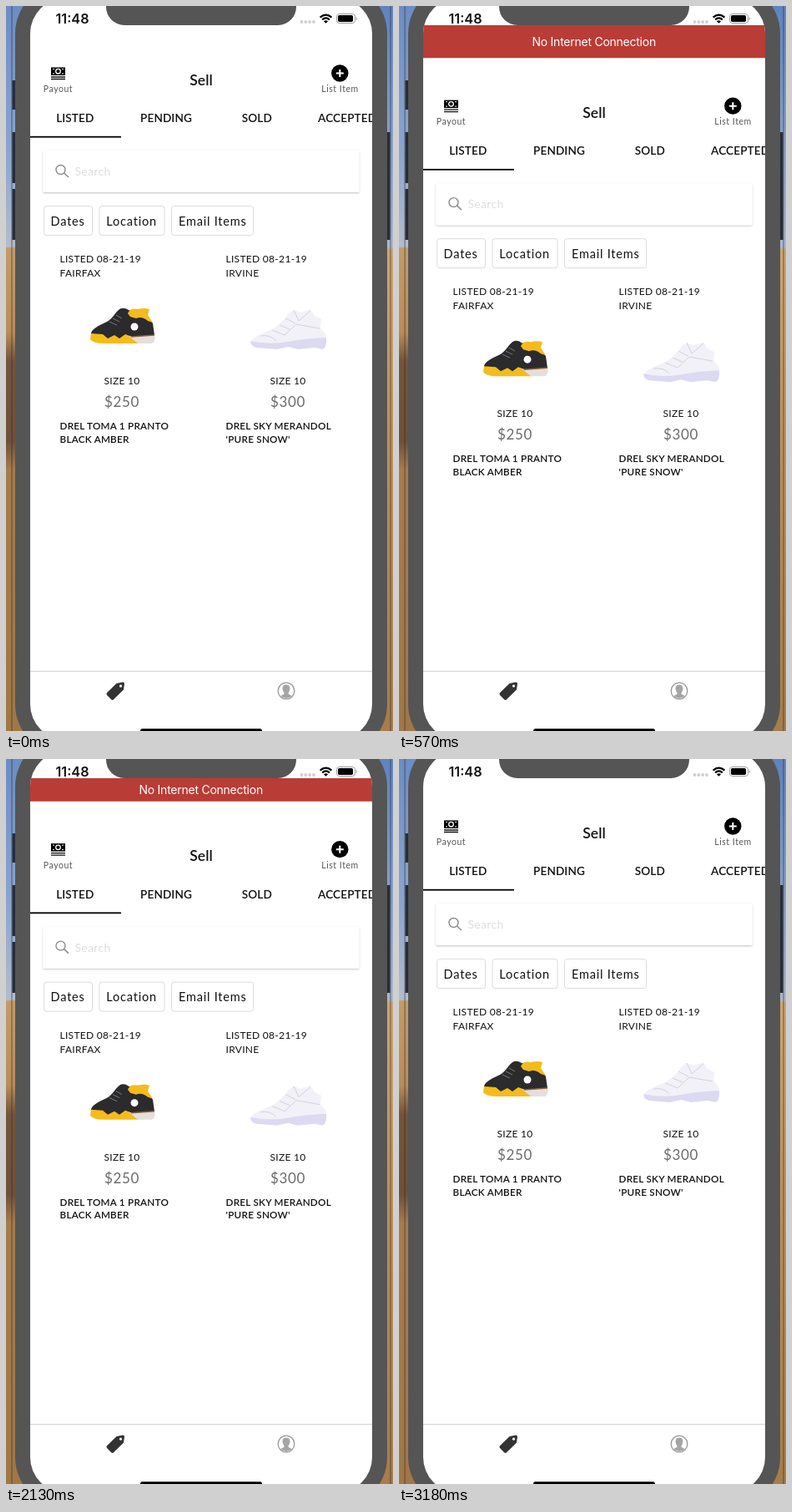
Recreate the animation shown at these times as an HTML page. Size 464 px wide and 868 px high, loop 3210 ms.

```html
<!DOCTYPE html>
<html lang="en">
<head>
<meta charset="utf-8">
<title>Sell screen</title>
<style>
html, body { margin: 0; width: 100%; height: 100%; overflow: hidden; background: #fff; }
svg { display: block; }
text { font-family: Lato, "Open Sans", sans-serif; fill: #111; }
.mid { text-anchor: middle; }
.ui { font-family: Inter, "Liberation Sans", sans-serif; }
.title { font-size: 17.5px; font-weight: 600; }
.small { font-size: 10.5px; letter-spacing: .55px; fill: #555; }
.tab { font-size: 13.6px; font-weight: 600; letter-spacing: .1px; }
.button { font-size: 14.5px; letter-spacing: .8px; }
.meta { font-size: 12px; letter-spacing: .3px; }
.price { font-size: 17px; letter-spacing: .7px; fill: #6b6b6b; }
.name { font-size: 11.7px; font-weight: 600; letter-spacing: .25px; }
.box { fill: #fff; stroke: #dcdcdc; }
</style>
</head>
<body>
<svg width="464" height="868" viewBox="0 0 464 868">
  <defs>
    <linearGradient id="left" x2="0" y2="1">
      <stop offset="0" stop-color="#6b8dc4"/>
      <stop offset=".2" stop-color="#8ba5cf"/>
      <stop offset=".332" stop-color="#b3bccb"/>
      <stop offset=".334" stop-color="#c39b68"/>
      <stop offset=".45" stop-color="#b98d58"/>
      <stop offset=".49" stop-color="#75543a"/>
      <stop offset=".6" stop-color="#6f5038"/>
      <stop offset=".64" stop-color="#a57c4c"/>
      <stop offset="1" stop-color="#a17746"/>
    </linearGradient>
    <linearGradient id="right" x2="0" y2="1">
      <stop offset="0" stop-color="#5f83bf"/>
      <stop offset=".332" stop-color="#a9b7cf"/>
      <stop offset=".336" stop-color="#cba473"/>
      <stop offset=".6" stop-color="#bd915c"/>
      <stop offset="1" stop-color="#a67d4b"/>
    </linearGradient>
    <filter id="shadow" x="-5%" y="-20%" width="110%" height="150%">
      <feDropShadow dx="0" dy="1" stdDeviation="1.1" flood-opacity=".25"/>
    </filter>
    <clipPath id="screen"><rect x="29" y="-9.5" width="410" height="888" rx="42.6"/></clipPath>
  </defs>

  <!-- desktop and phone body -->
  <rect width="232" height="868" fill="url(#left)"/>
  <rect x="232" width="232" height="868" fill="url(#right)"/>
  <path d="M7 0V868M461 0V868" stroke="#2b2b2b" stroke-opacity=".6"/>
  <path d="M9.5 89V124M9.5 151V212M9.5 219V280M458.5 151V280" stroke="#272d38" stroke-width="4"/>
  <rect x="11" y="-27.5" width="446" height="924" rx="60.6" fill="#555"/>

  <g clip-path="url(#screen)">
    <rect x="29" width="410" height="868" fill="#fff"/>

    <g id="page">
      <rect x="54" y="73.5" width="17" height="9.5"/>
      <path d="M54 85H71M54 87.5H71" stroke="#111" stroke-width="1.3"/>
      <circle cx="62.5" cy="78.2" r="2.8" fill="none" stroke="#fff" stroke-width="1.3"/>
      <path d="M56 75.5h2M67 75.5h2M56 81h2M67 81h2" stroke="#fff"/>
      <text class="small mid" x="62.5" y="103">Payout</text>
      <text class="title mid" x="234" y="94.5">Sell</text>
      <circle cx="400.3" cy="80.5" r="10.2"/>
      <path d="M395.8 80.5h9M400.3 76v9" stroke="#fff" stroke-width="2"/>
      <text class="small mid" x="400.5" y="103">List Item</text>

      <text class="tab mid" x="82.8" y="139">LISTED</text>
      <text class="tab mid" x="192" y="139">PENDING</text>
      <text class="tab mid" x="300.8" y="139">SOLD</text>
      <text class="tab" x="374" y="139">ACCEPTED</text>
      <rect x="29" y="155.8" width="109" height="1.8"/>

      <rect x="44.5" y="173" width="379" height="50" rx="1.5" fill="#fff" filter="url(#shadow)"/>
      <g fill="none" stroke="#8a8a8a" stroke-width="1.4">
        <circle cx="65.5" cy="196" r="5.5"/><path d="M69.5 200L75 205"/>
      </g>
      <text x="82.5" y="203" font-size="14" letter-spacing=".3" style="fill:#dedede">Search</text>

      <rect class="box" x="45.5" y="239.5" width="58" height="35" rx="3"/>
      <rect class="box" x="112" y="239.5" width="78" height="35" rx="3"/>
      <rect class="box" x="198.5" y="239.5" width="98" height="35" rx="3"/>
      <text class="button" x="53.6" y="262.7">Dates</text>
      <text class="button" x="120.3" y="262.7">Location</text>
      <text class="button" x="207" y="262.7">Email Items</text>

      <g id="items"></g>

      <!-- dark shoe -->
      <path fill="#f4bb1c" d="M102 391L157 391L160 404L118 404Q104 404 101 399Z"/>
      <path fill="#e4dfda" d="M146 394L178 394Q180 401 175 404L158 404Z"/>
      <path fill="#2b2a2d" d="M102 392C103 386 113 382 121 378C127 375 131 367 136 363Q141 360 147 364L168 370L176 380L178 394L151 396L143 393L136 398L130 394L122 398L116 393Z"/>
      <path fill="#f4bb1c" d="M146 368Q149 361 158 363Q166 361 172 363L170 370L176 379L170 377Q163 371 156 374L149 372Z"/>
      <path fill="none" stroke="#8d6040" stroke-width="1.5" d="M150 396L178 394"/>
      <path fill="none" stroke="#777" d="M124 378L133 382M128 374L136 378M132 370L139 374"/>
      <circle cx="154" cy="384" r="4.5" fill="#fff"/>

      <!-- pale shoe -->
      <path fill="#f2f1f8" d="M294 402C295 396 308 392 319 387C328 382 335 374 339 368L345 364L353 367L360 365L365 363L370 371L378 375L377 385L384 394L383 405L300 406Z"/>
      <path fill="#dcd9f3" d="M293 401Q315 406 338 402Q357 398 384 397Q385 408 380 411L370 409L350 411L338 408L325 411L300 409Q293 407 293 401Z"/>
      <path fill="none" stroke="#d3d2de" d="M319 388L334 394L348 381L376 386M328 382L340 387M335 374L347 380M345 364L351 377L365 365M305 395Q317 393 324 401"/>
    </g>

    <!-- banner, clipped to its growing height -->
    <svg id="banner" x="29" y="23" width="410" height="0">
      <rect width="410" height="40" fill="#b93c36"/>
      <text id="notice" class="ui mid" x="204.7" font-size="14" letter-spacing="-.25" style="fill:#fff">No Internet Connection</text>
    </svg>

    <!-- status bar -->
    <text class="ui" x="59.5" y="20.9" font-size="16.2" font-weight="600">11:48</text>
    <g fill="#cfcfcf">
      <circle cx="354.5" cy="19" r="1.9"/><circle cx="359.3" cy="19" r="1.9"/>
      <circle cx="364.1" cy="19" r="1.9"/><circle cx="368.9" cy="19" r="1.9"/>
    </g>
    <path d="M376.6 13.6Q383.5 7.5 390.4 13.6M379.2 16.3Q383.5 12.6 387.8 16.3" fill="none" stroke="#000" stroke-width="2.2"/>
    <path d="M380.9 18.2Q383.5 16.2 386.1 18.2L383.5 20.8Z"/>
    <rect x="396.5" y="9.5" width="22" height="11" rx="3.2" fill="none" stroke="#999"/>
    <rect x="398" y="11" width="18" height="8" rx="1.8"/>
    <path d="M419.8 13Q422 15 419.8 17.3Z" fill="#888"/>
    <path d="M120 0V1A22 22 0 0 0 142 23H326A22 22 0 0 0 348 1V0Z" fill="#555"/>

    <!-- tab bar -->
    <path d="M29 796.5H439" stroke="#d2d2d2"/>
    <path fill="#333" fill-rule="evenodd" d="M132.5 811L140 809.5Q142 809.5 142 811.5L141 818.5L129 830.3Q127.6 831.5 126.2 830.3L121 825Q119.8 823.5 121 822.2ZM137.5 812.6a1.6 1.6 0 1 0 .01 0Z"/>
    <circle cx="336" cy="820" r="9.8" fill="#fff" stroke="#989898" stroke-width="1.3"/>
    <path fill="#a5a5a5" d="M336 812.5C340 812.5 341.2 816 340 819.5Q339 822 338.3 823Q338.5 824 342.8 826Q336 832 329.2 826Q333.5 824 333.7 823Q333 822 332 819.5C330.8 816 332 812.5 336 812.5Z"/>
    <rect x="161" y="865.3" width="146" height="6" rx="2.5"/>
  </g>
</svg>
<script>
const LOOP = 3210, HEIGHT = 39.6, SLIDE = 378, OPEN = 219, CLOSE = 1991;
const $ = id => document.getElementById(id);

const label = (cls, x, y, str) => `<text class="${cls}" x="${x}" y="${y}">${str}</text>`;
const item = (x, city, price, line1, line2) =>
  label('meta', x, 307.2, 'LISTED 08-21-19') +
  label('meta', x, 324, city) +
  label('meta mid', x + 74.5, 453.2, 'SIZE 10') +
  label('price mid', x + 74.5, 480, price) +
  label('name', x, 507.2, line1) +
  label('name', x, 522.6, line2);

$('items').innerHTML =
  item(64.5, 'FAIRFAX', '$250', 'DREL TOMA 1 PRANTO', 'BLACK AMBER') +
  item(263.5, 'IRVINE', '$300', 'DREL SKY MERANDOL', "'PURE SNOW'");

// sine ease from 0 to 1, beginning at the given time
function slide(t, start) {
  const p = Math.min(1, Math.max(0, (t - start) / SLIDE));
  return (1 - Math.cos(Math.PI * p)) / 2;
}

function draw(now) {
  const t = now % LOOP;
  const h = HEIGHT * (slide(t, OPEN) - slide(t, CLOSE));
  $('page').setAttribute('transform', `translate(0 ${h})`);
  $('banner').setAttribute('height', h);
  $('notice').setAttribute('y', h / 2 + 5);
  requestAnimationFrame(draw);
}
draw(performance.now());
</script>
</body>
</html>
```
